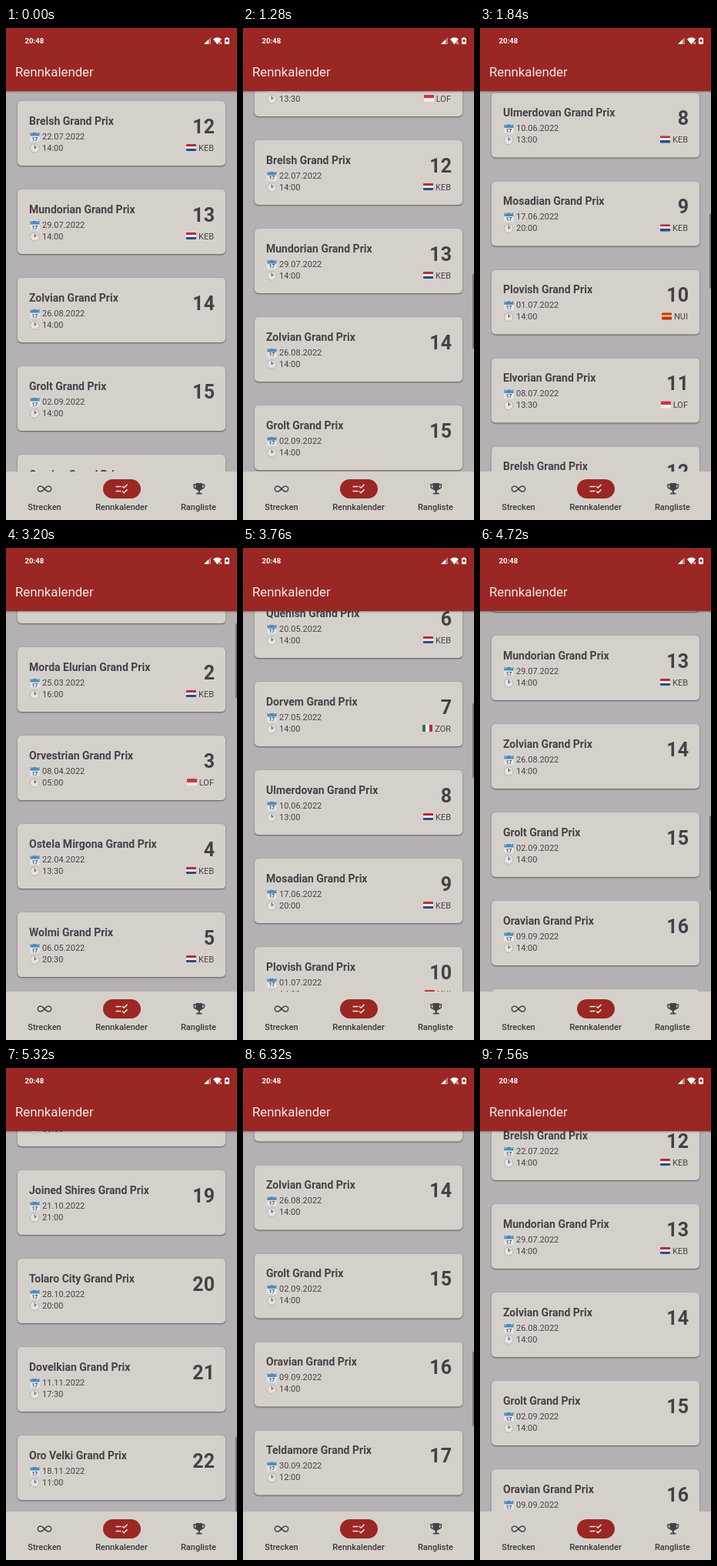
These frames come from a looping animation (300x640 px, 8.4 s). An HTML page:

```html
<!DOCTYPE html>
<html lang="de">
<head>
<meta charset="utf-8">
<title>Rennkalender</title>
<style>
  html, body { margin: 0; width: 100%; height: 100%; overflow: hidden; }
  body { position: relative; background: #b5b0b1; color: #464147; font-family: Roboto, sans-serif; }
  body div, body span, svg { position: absolute; white-space: nowrap; }
  header, nav { position: absolute; left: 0; width: 300px; overflow: hidden; }
  header { top: 0; height: 82px; background: #9a2723; color: #f5ebe8; box-shadow: 0 1px 2px #0006; }
  nav { top: 577px; height: 63px; background: #d6d0ca; }
  svg { left: 0; top: 0; }
  .clock { left: 24.5px; top: 10px; font: bold 9.6px/14px Roboto, sans-serif; color: #fff; }
  .heading { left: 12px; top: 45px; font-size: 16.8px; line-height: 24px; }
  .tab { top: 40px; width: 100px; text-align: center; font: 500 11px/14px Roboto, sans-serif; color: #3c373c; }
  .card { left: 15px; width: 270px; height: 84px; border-radius: 5px; background: #d6d0ca;
          box-shadow: 0 1px 2px #0007, 0 0 1px #0003; font-size: 11px; line-height: 14px; }
  .title { left: 15px; top: 17px; font: bold 14px/18px Roboto, sans-serif; }
  .round { right: 14px; top: 20px; font: bold 25px/28px Roboto, sans-serif; }
  .date { left: 32px; top: 40px; }
  .time { left: 32px; top: 55px; }
  .driver { right: 15px; top: 55px; }
  .flag { display: inline-block; width: 13px; height: 9px; margin-right: 3px; border-radius: 1px; }
  #bar { left: 298px; top: 0; width: 2px; height: 97px; background: #777274; }
</style>
</head>
<body>
<div id="list"></div>
<div id="bar"></div>

<header>
  <span class="clock">20:48</span>
  <svg width="300" height="82" fill="#fff">
    <path d="M257 21L266 12V21Z" opacity=".4"/>
    <path d="M257 21L263 15V21Z"/>
    <path d="M269 14.5Q274.5 10 280 14.5L274.5 21.5Z"/>
    <path d="M277 18l3 3m0-3l-3 3" stroke="#fff"/>
    <path d="M286 12h2v1h2v8h-6v-8h2Z"/>
    <path d="M285.5 15h3v3h-3Z" fill="#9a2723"/>
  </svg>
  <span class="heading">Rennkalender</span>
</header>

<nav>
  <svg width="300" height="63" fill="none" stroke="#464147" stroke-width="1.5">
    <path d="M50 22.5C47.500 19.500 46 19 44.800 19a3.500 3.500 0 0 0 0 7C46 26 47.500 25.500 50 22.500S54 19 55.200 19a3.500 3.500 0 0 1 0 7C54 26 52.500 25.500 50 22.500"/>
    <rect x="126" y="10" width="49" height="25" rx="12.500" fill="#9a2723" stroke="none"/>
    <path d="M142.500 19.500h7m-7 6h7m1.500-6.500l2.200 2.200 4.300-4.300m-6.500 8.600l2.200 2.200 4.300-4.300" stroke="#f3e6e2"/>
    <path d="M247 17h-3v2q0 3 4 3.500M254.500 17h3v2q0 3-4 3.500"/>
    <path d="M246.500 15h8.500v6q0 3-3.200 3.700v3h2.700v1.800h-7.500v-1.800h2.700v-3q-3.200-.7-3.200-3.700Z" fill="#464147" stroke="none"/>
  </svg>
  <span class="tab" style="left:0">Strecken</span>
  <span class="tab" style="left:100px">Rennkalender</span>
  <span class="tab" style="left:200px">Rangliste</span>
</nav>

<script>
const LOOP = 8400, PITCH = 115;

const stripes = (dir, a, b, c) =>
  `linear-gradient(${dir}, ${a} 0 33%, ${b} 33% 67%, ${c} 67%)`;
const flags = {
  KEB: stripes('180deg', '#b82c38', '#f1eeea', '#2c4a8c'),
  NUI: stripes('180deg', '#c23028', '#e8b32c', '#c23028'),
  LOF: 'linear-gradient(#cf3540 50%, #f1eeea 50%)',
  ZOR: stripes('90deg', '#2b7350', '#f1eeea', '#b82c38')
};

const races = `Solvane|18.03|16:00|LOF
Morda Elurian|25.03|16:00|KEB
Orvestrian|08.04|05:00|LOF
Ostela Mirgona|22.04|13:30|KEB
Wolmi|06.05|20:30|KEB
Quenish|20.05|14:00|KEB
Dorvem|27.05|14:00|ZOR
Ulmerdovan|10.06|13:00|KEB
Mosadian|17.06|20:00|KEB
Plovish|01.07|14:00|NUI
Elvorian|08.07|13:30|LOF
Brelsh|22.07|14:00|KEB
Mundorian|29.07|14:00|KEB
Zolvian|26.08|14:00
Grolt|02.09|14:00
Oravian|09.09|14:00
Teldamore|30.09|12:00
Wolenese|07.10|06:00
Joined Shires|21.10|21:00
Tolaro City|28.10|20:00
Dovelkian|11.11|17:30
Oro Velki|18.11|11:00`.split('\n').map(row => row.split('|'));

const icons = `<svg width="40" height="84">
  <rect x="16.500" y="41" width="12" height="11.500" rx="1" fill="#e6e6e6"/>
  <path d="M16.500 41h12v4.500h-12Z" fill="#4a8dbd"/>
  <path d="M18.500 40v2.500m7.500-2.500v2.500" stroke="#dbe4ea"/>
  <text x="22.500" y="51.500" font-size="6.500" font-weight="bold" text-anchor="middle" fill="#2f4f6b">17</text>
  <circle cx="22.300" cy="61.500" r="5.700" fill="#e6e3e0" stroke="#b5b1af"/>
  <path d="M22.300 57.500v4.300l2.600-2.300" fill="none" stroke="#4a474b"/>
</svg>`;

const list = document.getElementById('list');
const bar = document.getElementById('bar');

list.innerHTML = races.map(([name, date, time, driver], i) => `
  <div class="card" style="top:${i * PITCH}px">${icons}
    <span class="title">${name} Grand Prix</span>
    <span class="round">${i + 1}</span>
    <span class="date">${date}.2022</span>
    <span class="time">${time}</span>
    ${driver ? `<span class="driver"><i class="flag" style="background:${flags[driver]}"></i>${driver}</span>` : ''}
  </div>`).join('');

// [ms, title height of round 12]: two flings up, two down, one back
const keys = [
  [0, 121], [1180, 121], [1300, 185], [1500, 350], [1840, 570], [2180, 690],
  [2300, 800], [2500, 1130], [2720, 1390], [3080, 1390], [3200, 1306],
  [3400, 1060], [3700, 810], [4000, 670], [4280, 603.5], [4400, 560],
  [4560, 330], [4800, -120], [5000, -420], [5260, -646], [5480, -646],
  [5600, -585], [5800, -400], [6040, -215], [6320, -78], [6640, 40],
  [7080, 88], [LOOP, 88]
];

const slope = i => keys[i + 1]
  ? (keys[i + 1][1] - keys[i][1]) / (keys[i + 1][0] - keys[i][0]) : 0;

// Harmonic mean of neighbouring slopes keeps the curve monotone.
const tangents = keys.map((_, i) => {
  const a = i ? slope(i - 1) : 0, b = slope(i);
  return a * b > 0 ? 2 * a * b / (a + b) : 0;
});

function scrollAt(t) {
  const i = keys.findIndex((k, n) => n === keys.length - 2 || t < keys[n + 1][0]);
  const [t0, p0] = keys[i], [t1, p1] = keys[i + 1];
  const d = t1 - t0, u = (t - t0) / d, v = 1 - u;
  return p0 * (1 + 2 * u) * v * v + p1 * (3 - 2 * u) * u * u
    + d * u * v * (tangents[i] * v - tangents[i + 1] * u);
}

function frame() {
  const t = performance.now() % LOOP;
  const p = scrollAt(t);
  list.style.transform = `translateY(${p - 26 - 11 * PITCH}px)`;
  bar.style.transform = `translateY(${480 - 0.1957 * (p + 646)}px)`;
  bar.style.opacity = t < 1190 ? 0 : Math.min(1, Math.max(0, (7560 - t) / 220));
  requestAnimationFrame(frame);
}
frame();
</script>
</body>
</html>
```
